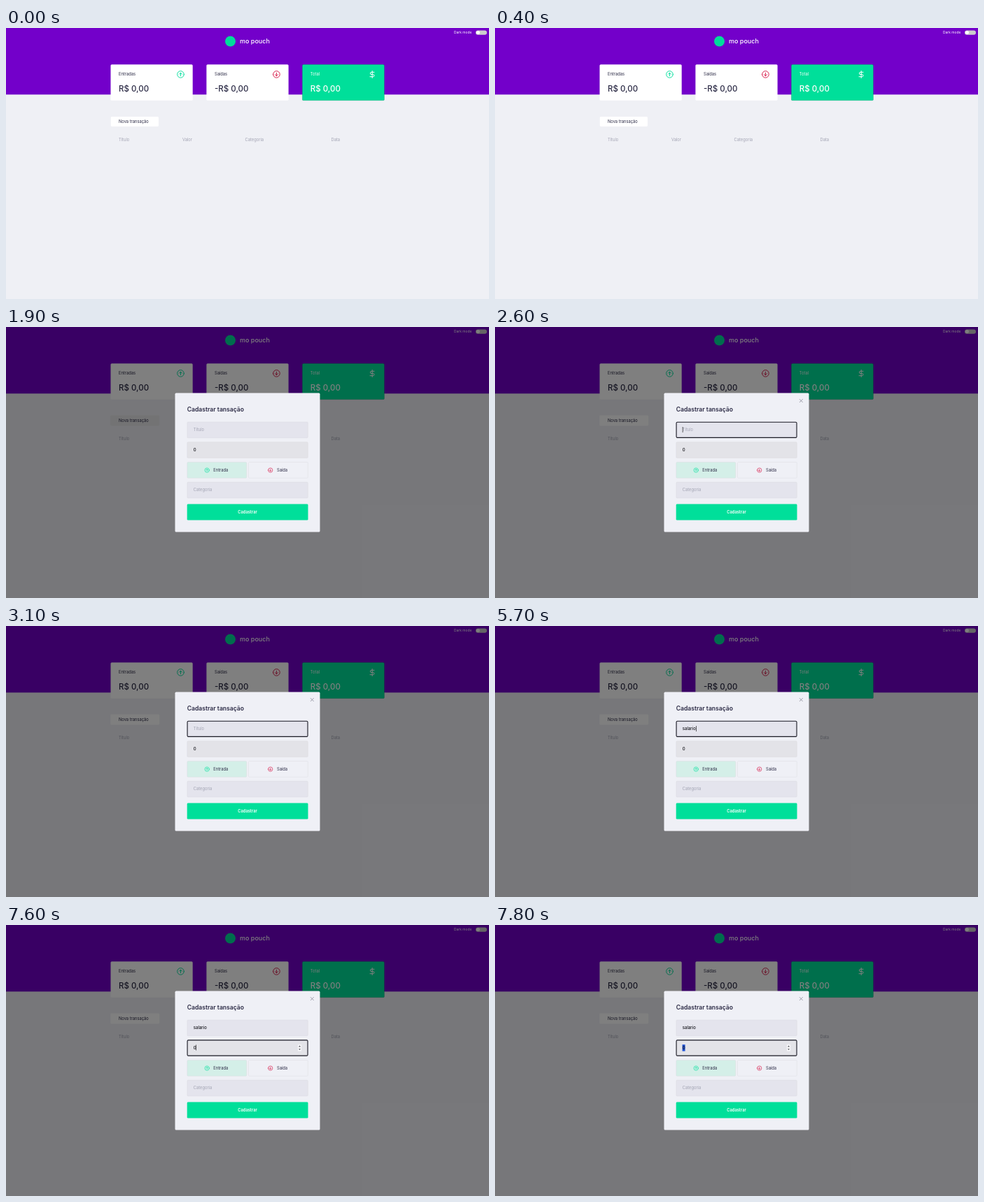
These frames come from a looping animation (690 px wide and 388 px high, 8000 ms). An HTML page:

```html
<!DOCTYPE html>
<html lang="pt-BR">
<head>
<meta charset="utf-8">
<title>Finanças</title>
<style>
  html, body { margin: 0; height: 100%; overflow: hidden; background: #eff0f5; }
  svg { display: block; width: 100vw; height: 100vh; }
  text { font: 400 5.75px Inter, "Open Sans", sans-serif; fill: #2b2a45; }
  .sum { font-size: 11.5px; font-weight: 500; }
  .muted { fill: #a2a3b3; }
  .white { fill: #fff; }
  .typed { font-size: 6px; font-weight: 500; fill: #16161c; }
  .field { fill: #e4e4ed; stroke: #d6d6dc; stroke-width: .4; }
  .focus { fill: none; stroke: #1b1b26; stroke-width: 1.1; }
  .line { fill: none; stroke-linecap: round; stroke-linejoin: round; }
  .in { stroke: #0be0a0; }
  .out { stroke: #d9204e; }
  [data-on] { visibility: hidden; }
</style>
</head>
<body>
<svg viewBox="0 0 690 388" preserveAspectRatio="none">
  <defs>
    <g id="arrow">
      <circle r="4.8"/>
      <path d="M0 2.2V-2.2M-2 -.3L0 -2.3L2 -.3"/>
    </g>
  </defs>

  <!-- Page -->
  <rect width="690" height="388" fill="#eff0f5"/>
  <rect width="690" height="95.3" fill="#7300ca"/>
  <circle cx="320.5" cy="19" r="7.5" fill="#00dc9b"/>
  <text x="334" y="22" class="white" style="font-size:9px;font-weight:500">mo pouch</text>
  <text x="640" y="8.4" class="white" style="font-size:4.9px">Dark mode</text>
  <rect x="671" y="3.4" width="16" height="6.4" rx="3.2" fill="#ccc"/>
  <circle cx="674.4" cy="6.6" r="2.5" fill="#fff"/>

  <rect x="149.5" y="52.2" width="117.2" height="51.6" rx="1.6" fill="#fff"/>
  <text x="161" y="68.3">Entradas</text>
  <text x="161" y="90.6" class="sum">R$ 0,00</text>
  <use href="#arrow" class="line in" transform="translate(249.5 66.4)"/>

  <rect x="286.4" y="52.2" width="117.2" height="51.6" rx="1.6" fill="#fff"/>
  <text x="298" y="68.3">Saídas</text>
  <text x="298" y="90.6" class="sum">-R$ 0,00</text>
  <use href="#arrow" class="line out" transform="translate(386.4 66.4) rotate(180)"/>

  <rect x="423.3" y="52.2" width="117.2" height="51.6" rx="1.6" fill="#00df9a" stroke="#000" stroke-opacity=".2" stroke-width=".6"/>
  <text x="434.8" y="68.3" class="white">Total</text>
  <text x="434.8" y="90.6" class="sum white">R$ 0,00</text>
  <path class="line" stroke="#fff" d="M523.2 61.4V71.6M526 63.3H522A1.55 1.55 0 0 0 522 66.5H524.4A1.55 1.55 0 0 1 524.4 69.7H520"/>

  <rect id="button" rx="1.4"/>
  <text x="161" y="135.9">Nova transação</text>
  <text x="161" y="161.7" class="muted">Título</text>
  <text x="252" y="161.7" class="muted">Valor</text>
  <text x="341.6" y="161.7" class="muted">Categoria</text>
  <text x="464.5" y="161.7" class="muted">Data</text>

  <!-- Dialog -->
  <g data-on="1900-8000">
    <rect width="690" height="388" fill-opacity=".5"/>
    <rect x="241.5" y="94.6" width="207" height="199" rx="1.6" fill="#eff0f6"/>
    <path data-on="2000-8000" class="line" stroke="#8a8b98" stroke-width=".8" d="M435.2 103.5l4.2 4.2m0-4.2l-4.2 4.2"/>
    <text x="258.7" y="121.1" style="font-size:8.6px;font-weight:600">Cadastrar tansação</text>

    <rect class="field" x="258.9" y="136" width="172.4" height="22.8" rx="1.3"/>
    <text data-on="1900-5700" x="267.8" y="149.2" class="muted">Título</text>
    <text data-on="5700-8000" x="267.8" y="149.2" class="typed">salario</text>
    <rect data-on="2600-7600" class="focus" x="259.1" y="136.2" width="171.9" height="22.2" rx="1.4"/>
    <rect data-on="2600-3100" x="267.8" y="143" width=".6" height="8"/>
    <rect data-on="5700-7100" x="287.2" y="143" width=".6" height="8"/>

    <rect class="field" x="258.9" y="164.7" width="172.4" height="22.8" rx="1.3" style="fill:#e3e3e8"/>
    <rect data-on="7600-8000" class="focus" x="259.1" y="164.9" width="171.9" height="22.2" rx="1.4"/>
    <text data-on="1900-7800" x="267.8" y="177.9" class="typed">0</text>
    <rect data-on="7600-7800" x="271.4" y="171.5" width=".6" height="8"/>
    <g data-on="7800-8000">
      <rect x="267.6" y="171.2" width="4" height="9.4" fill="#1d52d6"/>
      <text x="267.8" y="177.9" class="typed white">0</text>
    </g>
    <g data-on="2200-2300,7100-8000">
      <rect x="416.9" y="171.2" width="5.2" height="9.4" fill="#f6f6f8"/>
      <path fill="#505056" d="M418 174.4l1.5-1.8 1.5 1.8zM418 177.3l1.5 1.8 1.5-1.8z"/>
    </g>

    <rect class="field" x="258.9" y="193.5" width="84.8" height="22.8" rx="1.3" style="fill:#d4efe8"/>
    <use href="#arrow" class="line in" transform="translate(287.2 205) scale(.66)"/>
    <text x="296.3" y="206.9">Entrada</text>
    <rect class="field" x="346.5" y="193.5" width="84.8" height="22.8" rx="1.3" style="fill:#eff0f6"/>
    <use href="#arrow" class="line out" transform="translate(377.7 205) rotate(180) scale(.66)"/>
    <text x="387" y="206.9">Saída</text>

    <rect class="field" x="258.9" y="222.1" width="172.4" height="22.8" rx="1.3"/>
    <text x="267.8" y="235.4" class="muted">Categoria</text>
    <rect x="258.7" y="253.6" width="172.8" height="23" rx="1.4" fill="#00df9a"/>
    <text x="345" y="267.1" class="white" text-anchor="middle" style="font-weight:600">Cadastrar</text>
  </g>
</svg>
<script>
  const LOOP = 8000;
  const parts = [...document.querySelectorAll('[data-on]')].map(el => ({
    el,
    spans: el.dataset.on.split(',').map(span => span.split('-').map(Number))
  }));
  const button = document.getElementById('button');

  function setButton(x, y, width, height, fill) {
    for (const [name, value] of Object.entries({ x, y, width, height, fill })) {
      button.setAttribute(name, value);
    }
  }

  function draw(now) {
    const t = now % LOOP;
    for (const { el, spans } of parts) {
      const on = spans.some(([from, to]) => t >= from && t < to);
      el.style.visibility = on ? 'visible' : 'hidden';
    }
    if (t < 1600) setButton(149.8, 127, 68.2, 14, '#fff');
    else setButton(149.2, 126.4, 70, 15, t < 2000 ? '#e7e7e9' : '#fff');
    requestAnimationFrame(draw);
  }
  draw(performance.now());
</script>
</body>
</html>
```
